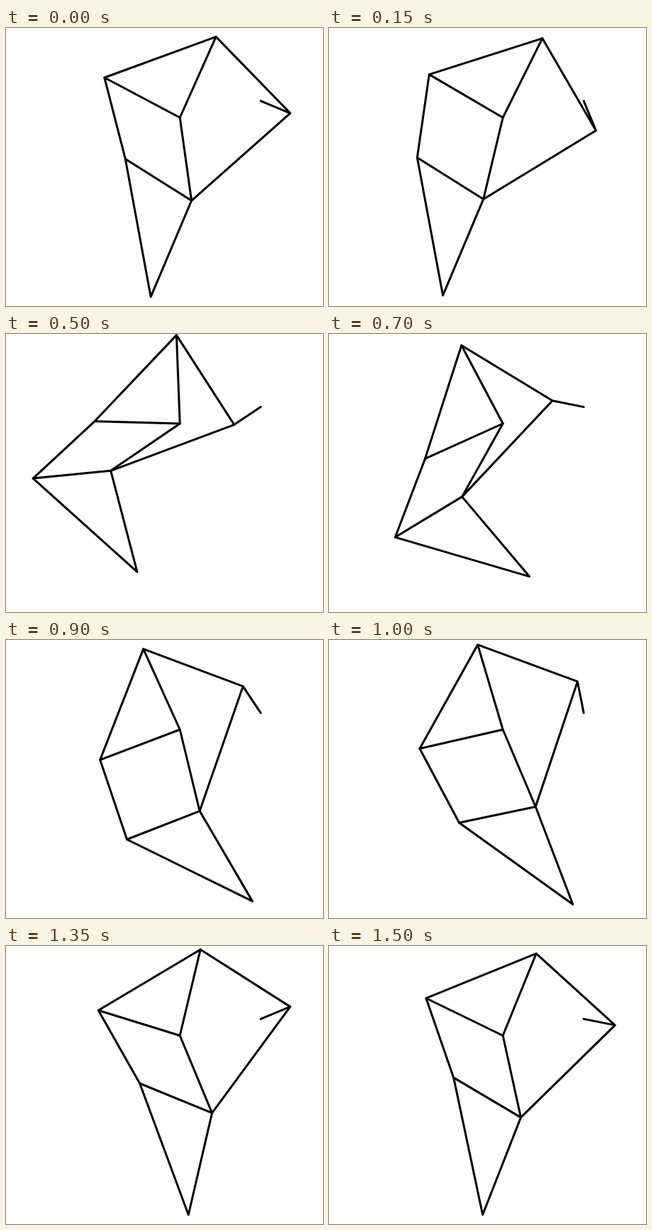
These frames come from a looping animation (447 by 391 pixels, 1.55 s). An HTML page with a canvas:

```html
<!DOCTYPE html>
<html>
<head>
<meta charset="utf-8">
<title>Walking linkage</title>
<style>
  html, body { margin: 0; height: 100%; overflow: hidden; background: #fefefc; }
  canvas { display: block; }
</style>
</head>
<body>
<canvas width="447" height="391"></canvas>
<script>
const ctx = document.querySelector('canvas').getContext('2d');
const SCALE = 3, STEP_MS = 50, STEPS = 31;
const axle = [359.2, 102.6];
const pivot = [axle[0] - 38 * SCALE, axle[1] + 7.8 * SCALE];

// Joint held by rods of length r from p and s from q, clockwise of p -> q
function joint(p, r, q, s) {
  const dx = q[0] - p[0], dy = q[1] - p[1], d = Math.hypot(dx, dy);
  r *= SCALE;
  s *= SCALE;
  const along = (r * r - s * s + d * d) / (2 * d);
  const across = Math.sqrt(r * r - along * along);
  return [p[0] + (dx * along - dy * across) / d,
          p[1] + (dy * along + dx * across) / d];
}

function line(...points) {
  ctx.beginPath();
  points.forEach(p => ctx.lineTo(...p));
  ctx.stroke();
}

function draw(now) {
  // The crank turns in 32nds and skips one position after the first step
  const step = Math.floor(now / STEP_MS) % STEPS;
  const angle = (step + (step ? 3 : 2)) * Math.PI / 16;
  const crank = [axle[0] + 15 * SCALE * Math.cos(angle),
                 axle[1] + 15 * SCALE * Math.sin(angle)];
  const top = joint(crank, 50, pivot, 41.5);
  const hip = joint(top, 55.8, pivot, 40.1);
  const knee = joint(pivot, 39.3, crank, 61.9);
  const heel = joint(hip, 39.4, knee, 36.7);
  const foot = joint(heel, 65.7, knee, 49);

  ctx.fillStyle = '#fefefc';
  ctx.fillRect(0, 0, 447, 391);
  ctx.strokeStyle = '#000';
  ctx.lineWidth = 3;
  ctx.lineCap = ctx.lineJoin = 'round';
  line(axle, crank, top, hip, heel, foot, knee, crank);
  line(top, pivot, hip);
  line(pivot, knee, heel);
  requestAnimationFrame(draw);
}
requestAnimationFrame(draw);
</script>
</body>
</html>
```
